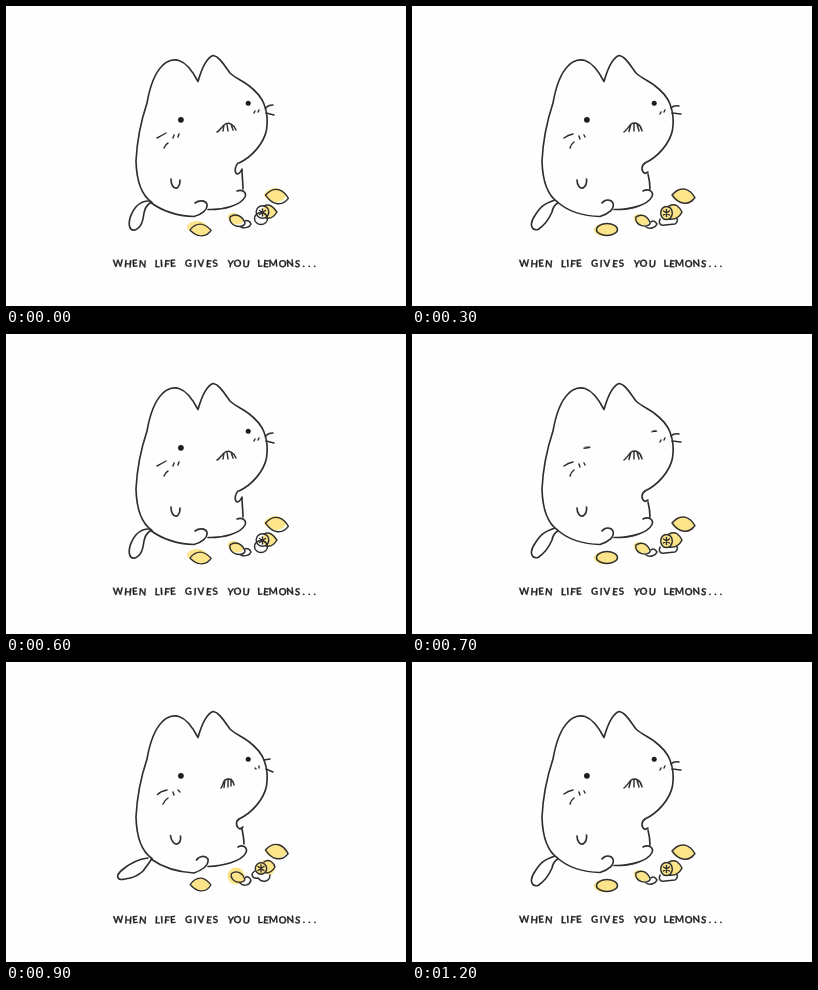
These frames come from a looping animation (400x300 px, 1300 ms). An HTML page:

```html
<!DOCTYPE html>
<html lang="en">
<head>
<meta charset="utf-8">
<title>When life gives you lemons</title>
<style>
html, body { margin: 0; width: 100%; height: 100%; overflow: hidden; background: #fefefe; }
svg { display: block; width: 100vw; height: 100vh; }
.ink { fill: none; stroke: #2e2e2e; stroke-width: 1.65; stroke-linecap: round; stroke-linejoin: round; }
.fine { stroke-width: 1.45; }
.juice { fill: #fbe48a; }
.peel { fill: #fefefe; }
.dot { fill: #1c1c1c; }
text {
  font: 700 9.8px Lato, "Open Sans", sans-serif; letter-spacing: .7px;
  fill: #242424; stroke: #242424; stroke-width: .25px;
}

.pose { visibility: hidden; animation: 1300ms step-end infinite; }
#a { animation-name: a; }
#b { animation-name: b; }
#c { animation-name: c; }
#d { animation-name: d; }
@keyframes a {
  0%, 46.15%, 76.92% { visibility: visible; }
  7.69%, 53.84%, 84.61%, 100% { visibility: hidden; }
}
@keyframes b {
  0%, 23.07%, 38.46%, 69.23%, 92.3%, 100% { visibility: hidden; }
  15.38%, 30.76%, 61.53%, 84.61% { visibility: visible; }
}
@keyframes c {
  0%, 15.38%, 46.15%, 76.92%, 100% { visibility: hidden; }
  7.69%, 38.46%, 69.23% { visibility: visible; }
}
@keyframes d {
  0%, 30.76%, 61.53%, 100% { visibility: hidden; }
  23.07%, 53.84%, 92.3% { visibility: visible; }
}
.eye { transform-box: fill-box; transform-origin: center; animation: blink 1300ms step-end infinite; }
@keyframes blink {
  0%, 69.23%, 100% { transform: none; }
  53.84% { transform: rotate(-8deg) scale(1.25, .35); }
  61.53% { transform: rotate(-8deg) scale(1.25, .65); }
}
/* the lettering trembles with the redrawn lines */
.words { animation: tremble 1300ms step-end infinite; }
@keyframes tremble {
  0%, 46.15%, 76.92%, 100% { transform: none; }
  7.69%, 38.46%, 69.23% { transform: translate(.2px, .2px); }
  15.38%, 30.76%, 61.53%, 84.61% { transform: translate(.1px, .3px); }
  23.07%, 53.84%, 92.3% { transform: translate(.2px, 0); }
}
</style>
</head>
<body>
<svg viewBox="0 0 400 300">
  <defs>
    <path id="lens" d="M-11.500 0C-8-5-4-7.500 1-7C6-6 9-3 11.500 .5C9 5 5 7.500 0 7C-5 7-8 4-11.500 0Z"/>
    <path id="half" d="M-8-3C-3-7 4-5 7 3C7 6 2 7-2 6C-6 5-9 1-8-3Z"/>
    <path id="star" d="M0-3.500V3.500M-3-2L3 2M-3 2L3-2"/>
  </defs>

  <!-- head, back and ears -->
  <path class="ink" d="M146 196.500C135 189 130.500 174 130 155C131 134 136 112 141 97C144 80 150 66 156 60C161 54 168 53 173 54.500C181 57 187 66 192 75.500C195 65 200 52 207 49.500C213 50 218 59 224 67C229 72 237 75 242 79C250 85 255 90 258 98C261 106 262 115 260.500 124C258 137 246 151 233 157"/>
  <circle class="dot eye" cx="174.900" cy="113.800" r="2.900"/>
  <circle class="dot eye" cx="242.200" cy="97.300" r="2.500"/>

  <g id="a" class="pose">
    <g class="juice">
      <ellipse cx="191" cy="221" rx="10" ry="6"/>
      <use href="#half" x="230" y="212"/>
      <ellipse cx="263" cy="206" rx="7.500" ry="6.500"/>
      <use href="#lens" x="269" y="189"/>
    </g>
    <path class="ink" d="M144 196C156 205 172 210 188 210.500C195 209 202 204 201 198C199 194 193 194 189 197M202 203.500C218 204 235 199 239 191C241 186 236 183 231 185M232 157C229 160 228 166 231 168C234 168 235 165 236 163C236 170 237 177 237 183"/>
    <path class="ink" d="M143 195C132 195 127 203 124 212C122 220 124 225 129 224C136 221 137 214 138 207C139 202 141 199 144 197"/>
    <path class="ink" d="M165 173C165 178 167 183 171 182C174 180 174 177 174 174"/>
    <path class="ink fine" d="M211 126C214 125 215 121 218 119C223 115 228 119 230 124M218 119L217 125M221 118L222 125M225 118L227 124M151 132Q155 130 160 127M158 142Q160 138 162 137M168 129L167 132M173 128L172 131M249 105L248 107M253 104L252 106M260 102Q262 99 267 99M260 107L268 109"/>
    <g class="ink fine">
      <use class="juice" href="#lens" transform="translate(194.500 224) scale(.92 .82)"/>
      <use href="#half" x="232" y="214"/>
      <path d="M235 221C239 223 244 221 245 218C244 215 241 214 239 215"/>
      <ellipse cx="255" cy="212.500" rx="6.500" ry="6"/>
      <circle cx="256.500" cy="206" r="6.300"/>
      <path d="M258 200C264 197 268 202 271 206C268 211 264 213 260 212"/>
      <use href="#star" x="256.500" y="206.500"/>
      <use href="#lens" transform="translate(271 190.500) rotate(7)"/>
    </g>
  </g>

  <g id="b" class="pose">
    <g class="juice">
      <ellipse cx="191" cy="225" rx="9" ry="6.500"/>
      <use href="#half" x="231" y="214"/>
      <ellipse cx="261" cy="206" rx="8" ry="6.500"/>
      <circle cx="255" cy="207" r="5.800"/>
      <use href="#lens" x="270.500" y="189.800"/>
    </g>
    <path class="ink" d="M146 196.500C157 206 172 210 187 211.500C195 209 202 204 202 198C200 192 193 193 191 198.500M202 204.500C218 204 236 199 240 191C242 186 238 182 233 184.500M233 157C229 160 230 166 235 167L237 164M236 168C237 172 238 177 238 182"/>
    <path class="ink" d="M146 196C137 196 126 203 118 211C113 215 112 220 118 221.300C127 219 132 214 137 209C140 204 143 200 146 197.500"/>
    <path class="ink" d="M164.500 172.500C165 178 168 182.500 171 182.500C174 181 175 178 174.500 174"/>
    <path class="ink fine" d="M213.500 125C216 124 216 120 219 119C223 116 228 118 230 123.500M219 119L217 125M221 118L222 124.500M225 118L227 124M151 133.500Q155 129 162 128M156.500 142Q159 137 162 135M167 129L168 132.500M173 128.500L175 130.500M249 106L250 107M253 104L253 106M257 97.500L263 98.500M261 107.500L268 109"/>
    <g class="ink fine">
      <use class="juice" href="#lens" transform="translate(195.300 222) scale(.92)"/>
      <use href="#half" transform="translate(232 214.500) scale(.95)"/>
      <path d="M235 219C235 224 242 224 244 220C245 217 241 214 239 216"/>
      <path d="M248 209C244 212 245 216 251 216C257 222 264 219 264 213"/>
      <circle cx="255" cy="207" r="5.800"/>
      <path d="M258 202C263 197 267 200 269 206C266 211 263 213 259 212"/>
      <use href="#star" x="255" y="207"/>
      <use href="#lens" transform="translate(271.200 189.800) scale(1.04)"/>
    </g>
  </g>

  <g id="c" class="pose">
    <g class="juice">
      <circle cx="230" cy="214" r="8.500"/>
      <ellipse cx="260" cy="206" rx="9" ry="8"/>
      <use href="#lens" x="270" y="189"/>
    </g>
    <path class="ink" d="M145 197C156 205 172 210 188 211C196 208 203 203 202 197C199 193 193 194 190.500 198M202 204.500C218 204 236 199 240 190.500C242 186 237 182 232 185M233 157C229 160 230 165 234 167L237 165M236 167C237 172 238 177 238 182"/>
    <path class="ink" d="M142 196C133 197 123 202 116 208C109 214 111 219 119 217C127 216 133 213 137 209C140 205 143 201 145 198"/>
    <path class="ink" d="M164.500 173.500C165 178 168 183 171 182C174 181 175 178 174.500 174"/>
    <path class="ink fine" d="M215 126C217 124 217 119 219 118C223 116 227 117 228 123M219 118L218 125.500M222 117L222 125M225 117L225 124M151.500 132.500Q155 129 161 128M157 142Q159 138 162 136M167 130L168 133M172 128L174 130M249 106L250 107M253 104L253 106M258 98L264 97M260 107L267 110"/>
    <g class="ink fine">
      <use class="juice" href="#lens" transform="translate(194.500 222.500) scale(.9)"/>
      <use href="#half" class="juice" transform="translate(232.500 214.500) scale(.9)"/>
      <path d="M234 221C238 225 244 223 245 218C243 214 240 214 239 216"/>
      <path class="peel" d="M249 209C244 212 246 217 252 216C257 222 264 219 264 213"/>
      <path d="M258 200C263 196 268 201 269 205C266 210 263 211 260 211"/>
      <circle class="juice" cx="255" cy="206.500" r="5.700"/>
      <use href="#star" x="255" y="206.500"/>
      <use href="#lens" transform="translate(270.800 189.500) rotate(8)"/>
    </g>
  </g>

  <g id="d" class="pose">
    <g class="juice">
      <ellipse cx="192" cy="224" rx="10" ry="6.500"/>
      <use href="#half" x="230" y="213"/>
      <ellipse cx="260" cy="206" rx="10" ry="6.500"/>
      <use href="#lens" x="271" y="190"/>
    </g>
    <path class="ink" d="M146 196.500C157 206 172 210 188 210.500C196 208 203 203 201 197C199 193 193 193 190 197M202 203.500C218 204 236 199 240 190.500C242 186 237 182 231 185M233 157C229 160 229 165 233 167.500L236 166M236 168C237 172 238 177 238 183"/>
    <path class="ink" d="M143 194C130 198 127 203 122 211C117 219 120 225 126 223.500C133 219 137 213 140 206C141 201 144 198 146 197"/>
    <path class="ink" d="M165 174C165 179 168 183 171 182C174 180 175 177 174.500 173"/>
    <path class="ink fine" d="M212 126C215 124 217 120 219 118C224 115 229 119 230 125M219 118L217 125.500M222 118L222 125M225 118L227 125M152 132Q156 129 161 128M158 142Q159 138 162 136M167 130L168 133M172 129L173 131M249 106L248 108M253 104L252 106M259 102Q262 99 267 100M260 107L269 108"/>
    <g class="ink fine">
      <ellipse class="juice" cx="195" cy="223.500" rx="10.500" ry="6"/>
      <use href="#half" transform="translate(231.500 214) scale(.95)"/>
      <path d="M234 221C238 224 244 221 245 218C243 215 241 214 239 216"/>
      <path class="peel" d="M248 213C246 218 249 220 253 219L263 218C266 216 266 213 264 212"/>
      <path class="juice" d="M257 200C264 196 268 202 270 206C267 212 262 214 256 213"/>
      <ellipse class="juice" cx="254.500" cy="207" rx="5.800" ry="6.600"/>
      <use href="#star" x="254.500" y="207"/>
      <use href="#lens" transform="translate(271.500 190) rotate(5)"/>
    </g>
  </g>

  <g class="words">
    <text y="261"><tspan x="107" rotate="-3 4 -4 5">WHEN</tspan> <tspan x="148.500" rotate="3 -3 4 -4">LIFE</tspan> <tspan x="179" letter-spacing="1.3" rotate="-4 3 -3 4 -5">GIVES</tspan> <tspan x="221" rotate="5 -3 4">YOU</tspan> <tspan x="251.500" letter-spacing=".3" rotate="-3 4 -3 3 -4 5">LEMONS</tspan><tspan x="296.500" letter-spacing="3.200">...</tspan></text>
  </g>
</svg>
</body>
</html>
```
